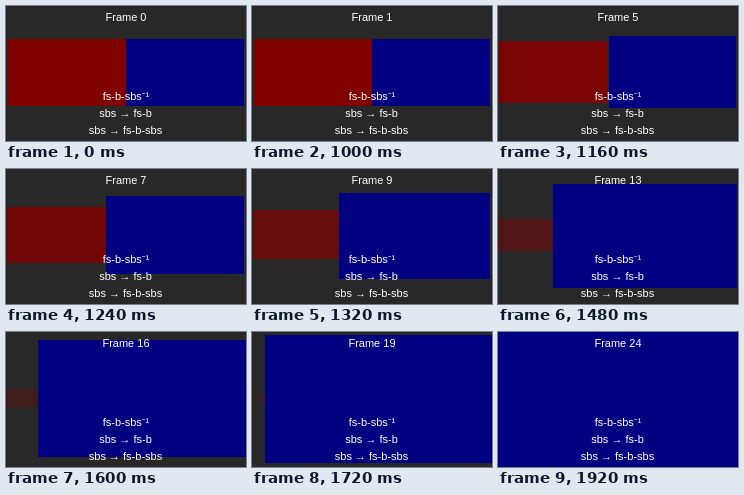
An HTML page for the animation above (2.92 s loop, 240 px wide and 135 px high).

```html
<!DOCTYPE html>
<html lang="en">
<head>
<meta charset="utf-8">
<title>Side-by-side transition</title>
<style>
  html, body { margin: 0; width: 100%; height: 100%; overflow: hidden; background: #282828; }
  svg { display: block; width: 100%; height: 100%; }
  rect { shape-rendering: crispEdges; }
  text { font: 11px "Liberation Sans", Arial, sans-serif; fill: #fff; text-anchor: middle; }
</style>
</head>
<body>
<svg viewBox="0 0 240 135">
  <rect id="red"/>
  <rect id="blue" fill="#000080"/>
  <text id="title" x="120" y="15">Frame 0</text>
  <text x="120" y="94">fs-b-sbs⁻¹</text>
  <text x="119.5" y="111">sbs → fs-b</text>
  <text x="119.5" y="128">sbs → fs-b-sbs</text>
</svg>
<script>
  const HOLD = 1000, STEP = 40, LAST = 24, LOOP = 2920;
  const red = document.getElementById('red');
  const blue = document.getElementById('blue');
  const title = document.getElementById('title');
  const start = performance.now();
  let shown = -1;

  const mix = (a, b, k) => a + (b - a) * k;

  // Positions snap down to whole pixels; sizes snap with the given rounding.
  function place(rect, x, y, width, height, snapSize) {
    rect.setAttribute('x', Math.floor(x));
    rect.setAttribute('y', Math.floor(y));
    rect.setAttribute('width', snapSize(width));
    rect.setAttribute('height', snapSize(height));
  }

  function draw(count) {
    const progress = Math.max(0, count - 1) / (LAST - 1);
    const k = (1 - Math.cos(Math.PI * progress)) / 2;

    place(blue, mix(120, 0, k), mix(33, 0, k), mix(118, 240, k), mix(67, 135, k), Math.ceil);
    place(red, mix(2, 0, k), mix(33, 66, k), mix(118, 2, k), mix(67, 2, k), Math.floor);

    // The shrinking half fades into the background.
    const dim = Math.round(mix(0, 40, k));
    red.setAttribute('fill', `rgb(${Math.round(mix(128, 40, k))},${dim},${dim})`);
    title.textContent = `Frame ${count}`;
  }

  function tick() {
    const time = (performance.now() - start) % LOOP;
    const count = time < HOLD ? 0 : Math.min(LAST, Math.floor((time - HOLD) / STEP) + 1);
    if (count !== shown) draw(shown = count);
    requestAnimationFrame(tick);
  }
  tick();
</script>
</body>
</html>
```
